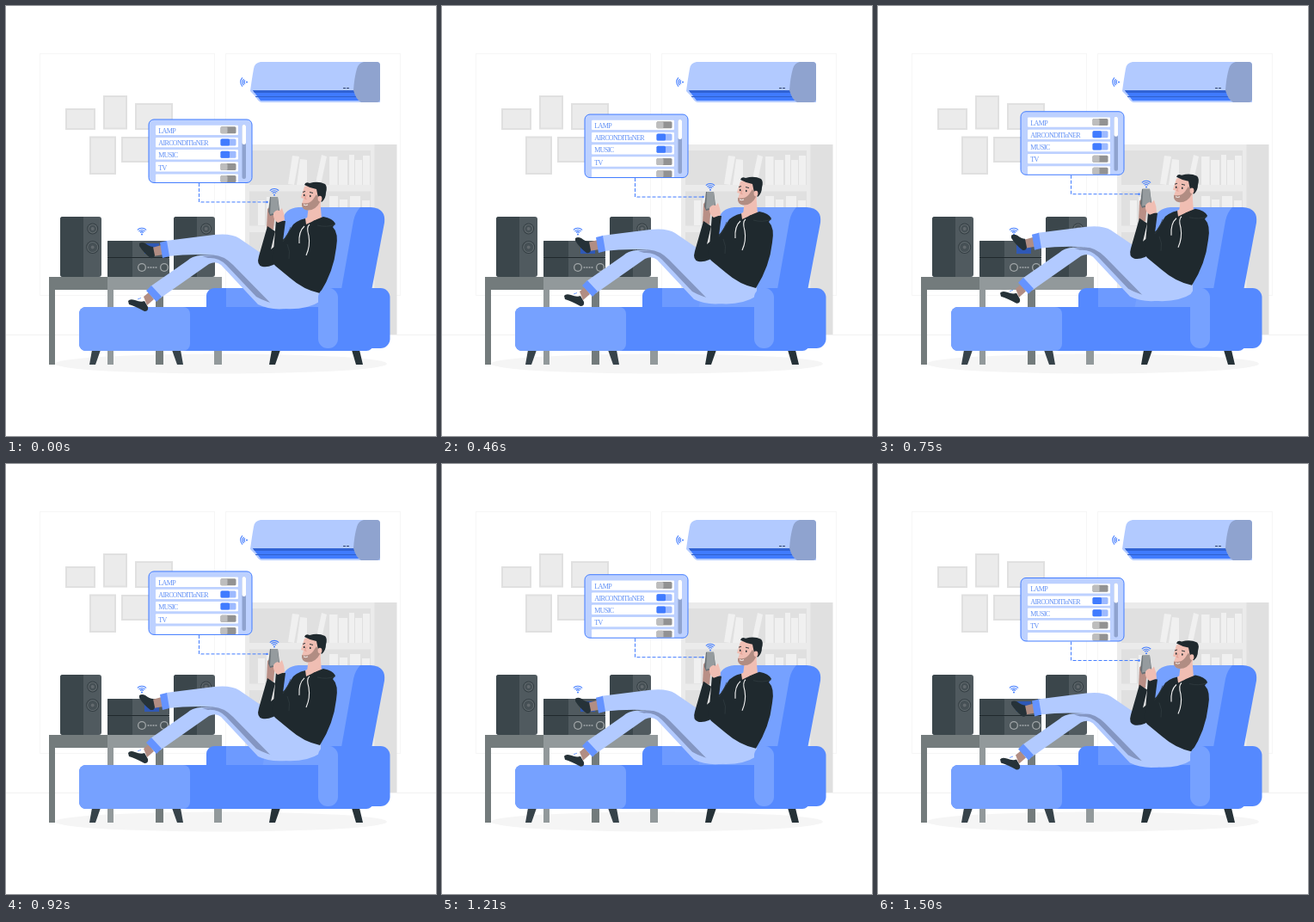
Write an HTML page with a canvas that moves like this. It is 500x500 px and loops after 1.54 s.

```html
<!DOCTYPE html>
<html lang="en">
<head>
<meta charset="utf-8">
<title>Smart home</title>
<style>
  html, body { margin: 0; width: 100%; height: 100%; overflow: hidden; background: #fff; }
  canvas { display: block; width: 500px; height: 500px; }
</style>
</head>
<body>
<canvas id="stage" width="500" height="500"></canvas>
<script>
const ctx = document.getElementById('stage').getContext('2d');
const LOOP = 1540, STEPS = 37;
const BLUE = '#407bff', MID = '#5589ff', SOFT = '#76a1ff', PALE = '#b2caff', SHADE = '#8fa3cf';
const INK = '#1f292e', SLATE = '#3b464b', STEEL = '#505a5f', SKIN = '#f0beb3', TAN = '#b18d83';

function box(x, y, w, h, color, r = 0) {
  ctx.fillStyle = color;
  ctx.beginPath();
  ctx.roundRect(x, y, w, h, r);
  ctx.fill();
}
function shape(d, color) {
  ctx.fillStyle = color;
  ctx.fill(new Path2D(d));
}
function line(d, color, width = 1) {
  ctx.strokeStyle = color;
  ctx.lineWidth = width;
  ctx.stroke(new Path2D(d));
}
function disc(x, y, r, color, ry = r) {
  ctx.fillStyle = color;
  ctx.beginPath();
  ctx.ellipse(x, y, r, ry, 0, 0, 7);
  ctx.fill();
}
function wifi(x, y, angle = -Math.PI / 2) {
  disc(x, y, 1, BLUE);
  ctx.strokeStyle = BLUE;
  ctx.lineWidth = 1.1;
  for (const r of [2.9, 5, 7.2]) {
    ctx.beginPath();
    ctx.arc(x, y, r, angle - 0.8, angle + 0.8);
    ctx.stroke();
  }
}

function room() {
  ctx.strokeStyle = '#f6f6f6';
  ctx.lineWidth = 1;
  ctx.strokeRect(39.5, 55.5, 203, 281);
  ctx.strokeRect(255.5, 55.5, 203, 281);
  line('M0 382.5H500', '#f2f2f2');
  const frames = [[69, 119, 35, 25], [113, 104, 28, 39.5], [150, 113, 44, 31], [97, 151.5, 31, 44.5], [134, 152, 44, 30]];
  for (const [x, y, w, h] of frames) {
    box(x, y, w, h, '#e0e0e0');
    box(x + 2, y + 2, w - 4, h - 4, '#ebebeb');
  }
}

function bookshelf() {
  box(278, 161, 151, 221, '#ebebeb');
  box(428.5, 161, 26, 221, '#e0e0e0');
  for (let y = 168; y < 340; y += 47.5) box(283, y, 141, 40, '#e0e0e0');
  shape('M333 174L341 175 335 208 328 207ZM342 178L350 179 350 208H338ZM367 173L373 175 366 208 360 206Z', '#f0f0f0');
  for (const [x, y, w] of [[376, 175, 9.5], [387, 179, 10], [399, 173, 6], [406, 179, 8], [415, 174, 8]]) {
    box(x, y, w, 208 - y, '#f0f0f0');
  }
  for (const [x, y, w] of [[293, 226, 8], [303, 222, 8], [376, 221, 10], [388, 225, 9], [400, 221, 12], [414, 226, 9]]) {
    box(x, y, w, 255 - y, '#f0f0f0');
  }
}

function airConditioner() {
  shape('M296 65H431Q435 65 435 69V112H297Q293 111 290 105L284 99Q286 84 288 73Q289 66 296 65Z', PALE);
  shape('M287 98H406L412 110H296Z', BLUE);
  shape('M287 98H405L407 101H289Z', '#3163d4');
  line('M290 105.5H409', '#2f60cc', 1);
  shape('M416 65H431Q435 65 435 69V108Q435 112 431 112H413Q407 109 404 98Q405 83 408 73Q410 66 416 65Z', SHADE);
  line('M392 95.5h3M396 95.5h3', '#34466f', 1);
  wifi(280, 88.5, Math.PI);
}

function speaker(x, split) {
  box(x, 245, 48, 70, STEEL, 3);
  box(x, 245, split, 70, SLATE, [3, 0, 0, 3]);
  for (const [y, r] of [[259, 6.4], [280.5, 7.5]]) {
    disc(x + 37.7, y, r, '#343e43');
    disc(x + 37.7, y, r - 1, '#656e72');
    disc(x + 37.7, y, r - 2, '#465055');
    disc(x + 37.7, y, 2, '#62696d');
  }
}

function stereo() {
  for (const [y, h] of [[273, 19], [293, 22]]) {
    box(118, y, 72, h, STEEL, 1);
    box(118, y, 29, h, SLATE, 1);
  }
  line('M118 292.5H190', '#20292d');
  box(161, 276, 17, 12, '#2f58b5');
  for (const x of [158, 184]) {
    disc(x, 304, 5, '#a1a7a9');
    disc(x, 304, 3.7, '#4b5559');
  }
  for (let x = 165.5; x < 177; x += 3) disc(x, 304, 1.1, '#9aa0a3');
}

function table() {
  const dark = '#737b7c', light = '#92999b';
  box(50, 315, 7, 102, dark);
  box(118, 315, 7, 102, light);
  box(174, 330, 9, 87, dark);
  box(242, 330, 9, 87, light);
  box(50, 315, 68, 15, dark);
  box(118, 315, 133, 15, light);
}

function chair() {
  shape('M100 400H110L104 417H97ZM193 400H203L206 417H199Z', '#37434a');
  shape('M309 400H319L313 417H306ZM402 400H411L415 417H407Z', '#263238');
  box(233, 328, 70, 32, MID, 9);
  box(256, 328, 60, 24, '#6d9aff');
  shape('M405 234H424Q442 235 440 252L425 331 386 340V250Z', MID);
  shape('M340 234H412Q406 240 404 250L386 352H298L321 250Q324 235 340 234Z', SOFT);
  box(85, 350, 342, 51, MID, [8, 0, 8, 8]);
  box(85, 350, 129, 51, SOFT, 8);
  box(370, 328, 76.5, 70, MID, 11);
}

function legs() {
  // far leg
  shape('M160 338L166 333 172 341 164 348Z', TAN);
  shape('M142 343Q144 340 150 342 157 345 161 343L165 350Q166 355 161 355 150 349 143 347Z', '#263238');
  line('M153 341l4-1.5', SOFT);
  shape('M168 326L211 296Q216 291 226 290L254 289 320 340 326 352Q307 354 293 347L250 301Q244 296 236 300L179 340Z', PALE);
  shape('M163 331L169 325 181 338 175 344Z', '#6593ff');
  shape('M228 291L255 289 318 347Q303 345 291 338L256 301Q247 292 235 293Z', '#8496c2');
  // near leg
  shape('M170 281L181 278 183 289 171 291Z', TAN);
  shape('M155 276Q158 274 162 276 167 280 171 280L173 290Q172 294 168 293 160 287 155 279Z', '#263238');
  shape('M186 273L242 266Q262 264 271 270L318 302 366 322V343Q346 356 313 351L264 301Q253 290 241 289.500Q214 288 188 291Z', PALE);
  shape('M179 275L187 273 190 291 182 293Z', '#6593ff');
}

function upperBody() {
  // far arm
  shape('M304 236Q308 231 313 239L311 260 303 258Z', '#b98f86');
  shape('M304 256L313 262 308 283 324 270 320 295Q308 305 298 303 291 301 294 291Z', INK);
  // head
  shape('M352 232L365 222 367 248Q358 252 350 248Z', SKIN);
  shape('M347 210Q356 206 364 211L366 229Q360 236 350 237 344 236 344 230L346 224 343 223Z', SKIN);
  shape('M344 229Q352 231 357 225L361 219 365 228Q360 238 350 237.500 343 236 344 229Z', TAN);
  line('M346 231q2.500 1.500 5 0', '#fff', 0.9);
  disc(346.7, 220, 0.8, INK, 1.2);
  disc(353.8, 221, 0.8, INK, 1.2);
  line('M345 216.500l3-1M353 216.500l4 1', INK, 0.9);
  line('M349 220l-1.500 4 2 .5', '#d88f83', 0.7);
  shape('M347 208Q348 204 353 206 363 203 371 207 374 210 372 217 372 224 367 228L363 223 361 213Q354 212 347 208Z', INK);
  disc(365, 224, 2.4, SKIN, 3.2);
  // torso and near arm
  shape('M314 249L325 250 322 273 334 254Q344 246 354 247L359 249 369 245Q380 247 383 253L380 257Q387 264 384 281 381 309 365 334 346 330 330 316L313 302Q307 296 311 285Z', INK);
  shape('M348 247L364 239 364 246Q356 251 349 254Z', SKIN);
  line('M383 254Q373 258 362 255M327 277Q331 285 329 294M331 257Q329 265 322 274', '#333e43', 0.7);
  line('M353 254Q349 257 352 267 354 279 349 290M347 256Q340 262 341 276', '#f4f4f4', 1.1);
  // phone and near hand
  shape('M307 222H316L318.500 241 307 244 305 239Z', '#697176');
  shape('M308 222H316L317.500 240 307 242Z', '#959b9e');
  shape('M311 241Q314 236 318 238L321 235Q324 242 324 249L316 252Q310 248 311 241Z', SKIN);
  wifi(312, 219.7);
}

function toggle(y, on) {
  box(249.500, y, 18, 8, on ? '#9dbaff' : '#929292', 1.5);
  box(249.500, y, on ? 10.5 : 8, 8, on ? BLUE : '#bdbdbd', 1.5);
}

function panel() {
  box(166, 132, 120, 73.5, '#bdd1ff', 6);
  ctx.save();
  ctx.beginPath();
  ctx.roundRect(166, 132, 120, 73.5, 6);
  ctx.clip();
  ctx.font = '8px "Liberation Serif", serif';
  ctx.letterSpacing = '-0.65px';
  ['LAMP', 'AIRCONDITIoNER', 'MUSIC', 'TV', ''].forEach((label, i) => {
    const y = 138.7 + i * 14.2;
    box(174, y, 96, 11.3, '#fff', 1);
    ctx.fillStyle = '#5d8df5';
    ctx.fillText(label, 177.3, y + 9.3);
    toggle(y + 1.6, i === 1 || i === 2);
  });
  ctx.restore();
  box(274.5, 138, 4.5, 63, SHADE, 2);
  box(274.5, 138, 4.5, 23, '#fff', 2);
  ctx.strokeStyle = BLUE;
  ctx.lineWidth = 1;
  ctx.beginPath();
  ctx.roundRect(166, 132, 120, 73.5, 6);
  ctx.stroke();
  ctx.setLineDash([4, 2]);
  line('M224.500 206V228H303', BLUE);
  ctx.setLineDash([]);
  disc(303.5, 228, 1.2, BLUE);
}

// Linear rise and fall over ten pixels, lowest shortly before the loop restarts.
function lift(ms) {
  const step = Math.floor((ms % LOOP + 4) / LOOP * STEPS);
  const phase = (step / STEPS + 40 / LOOP) % 1;
  return 0.5 - 10 * (1 - Math.abs(1 - 2 * phase));
}

function draw(ms) {
  ctx.fillStyle = '#fff';
  ctx.fillRect(0, 0, 500, 500);
  room();
  bookshelf();
  airConditioner();
  disc(250, 416, 193, '#f5f5f5', 11.5);
  table();
  speaker(63, 27);
  speaker(195, 27);
  stereo();
  wifi(158, 265.5);
  chair();
  ctx.save();
  ctx.translate(0, lift(ms));
  legs();
  upperBody();
  panel();
  ctx.restore();
  box(363, 328, 23, 70, SOFT, 11);
}

const start = performance.now();
function tick() {
  draw(performance.now() - start);
  requestAnimationFrame(tick);
}
tick();
</script>
</body>
</html>
```
